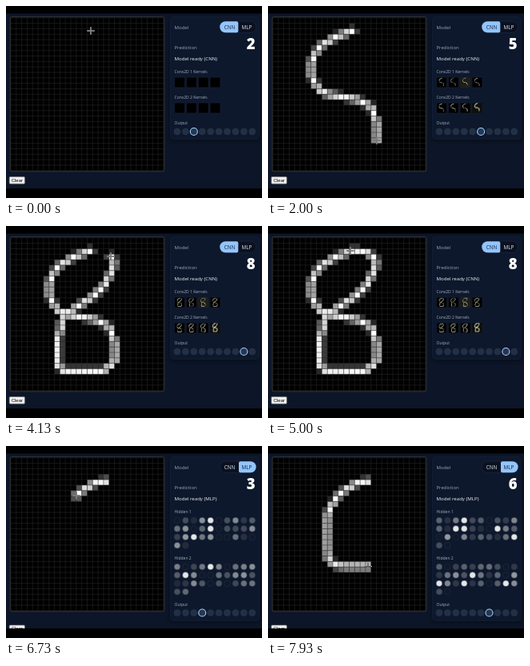
Recreate the animation shown at these times as an HTML page with a canvas. Size 320 px wide and 240 px high, loop 8000 ms.

```html
<!DOCTYPE html>
<html lang="en">
<head>
<meta charset="utf-8">
<title>Digit recogniser</title>
<style>
  html, body { margin: 0; width: 100%; height: 100%; overflow: hidden; background: #000; }
  canvas { display: block; width: 320px; height: 240px; }
</style>
</head>
<body>
<canvas id="stage"></canvas>
<script>
const LOOP = 8000, FPS = 15, CLEAR_AT = 5930;
const N = 28, CELL = 6.82, GX = 6, GY = 14.8;
const SANS = '"Open Sans", "Noto Sans", sans-serif';
const BLUE = '#93c5fd';

const canvas = document.getElementById('stage');
const ratio = window.devicePixelRatio || 1;
canvas.width = 320 * ratio;
canvas.height = 240 * ratio;
const ctx = canvas.getContext('2d');
ctx.scale(ratio, ratio);

// Each move: arrival time, then the corners passed on the way (x, y, ...).
const eight = { start: 210, x: 106, y: 31, penFrom: 0, moves: [
  [1070, 86, 38, 64, 51, 54, 70],
  [2000, 54, 87, 63, 104, 74, 110, 112, 117, 129, 126, 136, 145, 136, 168],
  [2800, 131, 174, 122, 181, 72, 181, 65, 174, 65, 166],
  [3000, 65, 140, 69, 127],
  [3670, 69, 120, 75, 110, 109, 88],
  [4130, 124, 73, 134, 52, 135, 43, 131, 38],
  [4990, 124, 33, 114, 31, 103, 31]
] };
const six = { start: CLEAR_AT, x: 124, y: 54, penFrom: 6200, moves: [
  [6200, 125, 44],
  [6730, 116, 45, 108, 48, 92, 58, 88, 62],
  [7600, 77, 78, 74, 88, 74, 125, 75, 141, 84, 149],
  [7930, 95, 150.5, 125, 150.5]
] };

// Time at which the shown digit changes.
const predictions = [
  [0, 2], [600, 1], [1330, 5], [3400, 8], [CLEAR_AT, 1], [6330, 3], [7270, 6]
];

// Strongest units of the two hidden layers; the others follow a seeded random level.
const hidden = [
  { t: 5930, lit: [[0, 7, 13, 25, 27], [3, 20, 25]] },
  { t: 6730, lit: [[4, 14, 22], [4, 11]] },
  { t: 7930, lit: [[3, 12, 13, 17, 29], [14, 20, 23, 28]] }
];

function random(seed) {
  const v = Math.sin(seed * 12.9898) * 43758.5453;
  return v - Math.floor(v);
}

hidden.forEach((state, k) => {
  state.levels = state.lit.map((lit, layer) => Array.from({ length: 32 }, (_, i) => {
    const r = random(1 + i + 40 * layer + 97 * k);
    return lit.includes(i) ? .95 : r < .25 ? 0 : .7 * (r - .15);
  }));
});

function trace({ start, x, y, penFrom, moves }) {
  const out = [{ x, y, t: start, pen: start >= penFrom }];
  let from = start;
  for (const [until, ...xy] of moves) {
    const legs = [];
    let total = 0;
    for (let i = 0; i < xy.length; i += 2) {
      const bx = xy[i], by = xy[i + 1], len = Math.hypot(bx - x, by - y);
      legs.push({ ax: x, ay: y, bx, by, len, before: total });
      total += len;
      x = bx;
      y = by;
    }
    for (const { ax, ay, bx, by, len, before } of legs) {
      const n = Math.ceil(len / 1.7);
      for (let k = 1; k <= n; k++) {
        const f = k / n, t = from + (until - from) * (before + len * f) / total;
        out.push({ x: ax + (bx - ax) * f, y: ay + (by - ay) * f, t, pen: t >= penFrom });
      }
    }
    from = until;
  }
  return out;
}
const samples = [eight, six].flatMap(trace);

function inkAt(time) {
  const from = time >= CLEAR_AT ? CLEAR_AT : 0;
  const ink = new Float32Array(N * N);
  for (const s of samples) {
    if (!s.pen || s.t < from || s.t > time) continue;
    const u = (s.x - GX) / CELL - .5, v = (s.y - GY) / CELL - .5;
    for (let r = Math.floor(v) - 1; r <= v + 2; r++) {
      for (let c = Math.floor(u) - 1; c <= u + 2; c++) {
        const level = Math.min(1, 1.12 - 1.05 * Math.hypot(c - u, r - v));
        if (level > .13) ink[r * N + c] = Math.max(ink[r * N + c], level);
      }
    }
  }
  return ink;
}

function lastBefore(list, time, key) {
  let hit = list[0];
  for (const item of list) if (item[key] <= time) hit = item;
  return hit;
}

function box(x, y, w, h, r, fill, stroke) {
  ctx.beginPath();
  ctx.roundRect(x, y, w, h, r);
  if (fill) { ctx.fillStyle = fill; ctx.fill(); }
  if (stroke) { ctx.strokeStyle = stroke; ctx.lineWidth = .7; ctx.stroke(); }
}

function disc(x, y, r, fill, stroke, width) {
  ctx.beginPath();
  ctx.arc(x, y, r, 0, 7);
  ctx.fillStyle = fill;
  ctx.fill();
  ctx.strokeStyle = stroke;
  ctx.lineWidth = width;
  ctx.stroke();
}

function text(str, x, y, size, color, weight = 400, align = 'left', family = SANS) {
  ctx.font = `${weight} ${size}px ${family}`;
  ctx.textAlign = align;
  ctx.fillStyle = color;
  ctx.fillText(str, x, y);
}

const unitX = i => 214 + 10.42 * i;

function drawBoard(ink) {
  box(5.2, 13.6, 192.6, 193.2, 2, '#000', '#4a4a45');
  ink.forEach((v, i) => {
    if (!v) return;
    const g = Math.round(255 * v);
    ctx.fillStyle = `rgb(${g},${g},${g})`;
    ctx.fillRect(GX + i % N * CELL, GY + Math.floor(i / N) * CELL, CELL, CELL);
  });
  ctx.beginPath();
  for (let i = 0; i <= N; i++) {
    const d = i * CELL, end = N * CELL;
    ctx.moveTo(GX + d, GY);
    ctx.lineTo(GX + d, GY + end);
    ctx.moveTo(GX, GY + d);
    ctx.lineTo(GX + end, GY + d);
  }
  ctx.strokeStyle = 'rgba(48,48,48,.8)';
  ctx.lineWidth = .6;
  ctx.stroke();
}

function drawCursor({ x, y }) {
  ctx.save();
  ctx.globalCompositeOperation = 'difference';
  ctx.fillStyle = '#f4f4f4';
  ctx.fillRect(x - 4.8, y - .5, 9.6, 1);
  ctx.fillRect(x - .5, y - 4.8, 1, 4.3);
  ctx.fillRect(x - .5, y + .5, 1, 4.3);
  ctx.restore();
}

// An edge filter whose direction turns from kernel to kernel.
function drawKernel(layer, i, ink) {
  const x = 210.6 + 14.8 * i, y = 89 + 32 * layer, size = 13, p = size / N;
  box(x, y, size, size, 1.5, '#000', '#16223a');
  if (!ink.some(v => v)) return;
  const angle = .8 + 2.2 * i + layer, reach = 1.4 + .6 * layer;
  const dx = Math.round(reach * Math.cos(angle)), dy = Math.round(reach * Math.sin(angle));
  const blurry = layer === 1 && i === 3, washed = layer === 0 && i === 2;
  const near = blurry ? .8 : -.8, base = blurry ? .1 : washed ? .17 : 0;
  ctx.save();
  ctx.beginPath();
  ctx.roundRect(x, y, size, size, 1.5);
  ctx.clip();
  for (let r = 0; r < N; r++) {
    for (let c = 0; c < N; c++) {
      const side = ink[(r + dy) * N + c + dx] || 0;
      const v = Math.min(1, base + 1.1 * ink[r * N + c] + near * side);
      if (v < .02) continue;
      const g = Math.round(250 * v);
      ctx.fillStyle = `rgb(${g},${g},${Math.round(g * .86)})`;
      ctx.fillRect(x + c * p, y + r * p, p + .1, p + .1);
    }
  }
  ctx.restore();
}

function drawLayer(layer, y, time) {
  const k = time < hidden[1].t ? 0 : 1;
  const a = hidden[k], b = hidden[k + 1];
  const f = Math.max(0, Math.min(1, (time - a.t) / (b.t - a.t)));
  for (let i = 0; i < 32; i++) {
    const v = a.levels[layer][i] * (1 - f) + b.levels[layer][i] * f;
    const mix = (lo, hi) => Math.round(lo + (hi - lo) * v);
    const fill = `rgb(${mix(16, 240)},${mix(25, 242)},${mix(43, 240)})`;
    disc(unitX(i % 10), y + 10.4 * Math.floor(i / 10), 3.8, fill, '#26324a', .5);
  }
}

function drawOutput(y, digit) {
  text('Output', 210.5, y - 8.8, 5, '#a3aec0');
  for (let i = 0; i < 10; i++) {
    if (i === digit) disc(unitX(i), y, 4.5, '#243753', '#a9d0fb', 1.1);
    else disc(unitX(i), y, 4, '#222f45', '#2b394f', .5);
  }
}

function drawPanel(time, ink) {
  const mlp = time >= CLEAR_AT;
  const digit = lastBefore(predictions, time, 0)[1];
  const height = mlp ? 205 : 153;

  ctx.save();
  ctx.shadowColor = 'rgba(0,0,0,.45)';
  ctx.shadowBlur = 5 * ratio;
  ctx.shadowOffsetY = 2 * ratio;
  box(205.5, 13.5, 111, height, 4, '#0e182c');
  ctx.restore();
  box(205.5, 13.5, 111, height, 4, null, '#15213a');

  text('Model', 210.5, 29, 6, '#9aa6b9');
  box(267, 19, 45.7, 14.4, 7.2, '#0b1120', '#1c2942');
  if (mlp) box(291, 19.2, 21.6, 14, [2, 7, 7, 2], BLUE);
  else box(267.3, 19.2, 23, 14, [7, 2, 2, 7], BLUE);
  text('CNN', 279.5, 28.6, 6.4, mlp ? '#dce4ef' : '#14233b', 500, 'center');
  text('MLP', 301, 28.6, 6.4, mlp ? '#14233b' : '#dce4ef', 500, 'center');

  text('Prediction', 210.5, 54, 6, '#9aa6b9');
  text(digit, 311.5, 54.2, 18.5, '#fff', 800, 'right');
  text(`Model ready (${mlp ? 'MLP' : 'CNN'})`, 210.5, 68, 6.1, '#eef2f8', 500);

  for (let layer = 0; layer < 2; layer++) {
    if (mlp) {
      const y = 93 + 58 * layer;
      text(`Hidden ${layer + 1}`, 210.5, y - 9, 5, '#a3aec0');
      drawLayer(layer, y, time);
    } else {
      text(`Conv2D ${layer + 1} Kernels`, 210.5, 84 + 32 * layer, 5, '#a3aec0');
      for (let i = 0; i < 4; i++) drawKernel(layer, i, ink);
    }
  }
  drawOutput(mlp ? 208.5 : 157, digit);
}

function draw(time) {
  const ink = inkAt(time);
  ctx.fillStyle = '#000';
  ctx.fillRect(0, 0, 320, 240);
  ctx.save();
  ctx.beginPath();
  ctx.rect(0, 9.5, 320, 218.5);
  ctx.clip();
  ctx.fillStyle = '#0c1628';
  ctx.fillRect(0, 9, 320, 220);
  drawBoard(ink);
  drawPanel(time, ink);
  const top = time >= CLEAR_AT ? 224 : 213.6;
  box(4.2, top, 19.2, 8.6, 1, '#f3f3f3', '#777');
  text('Clear', 13.8, top + 6.4, 6, '#000', 400, 'center', '"Liberation Sans", sans-serif');
  drawCursor(lastBefore(samples, time, 't'));
  ctx.restore();
}

function tick(now) {
  const step = Math.floor((now % LOOP + 5) * FPS / 1000);
  draw(step * 1000 / FPS);
  requestAnimationFrame(tick);
}
requestAnimationFrame(tick);
</script>
</body>
</html>
```
